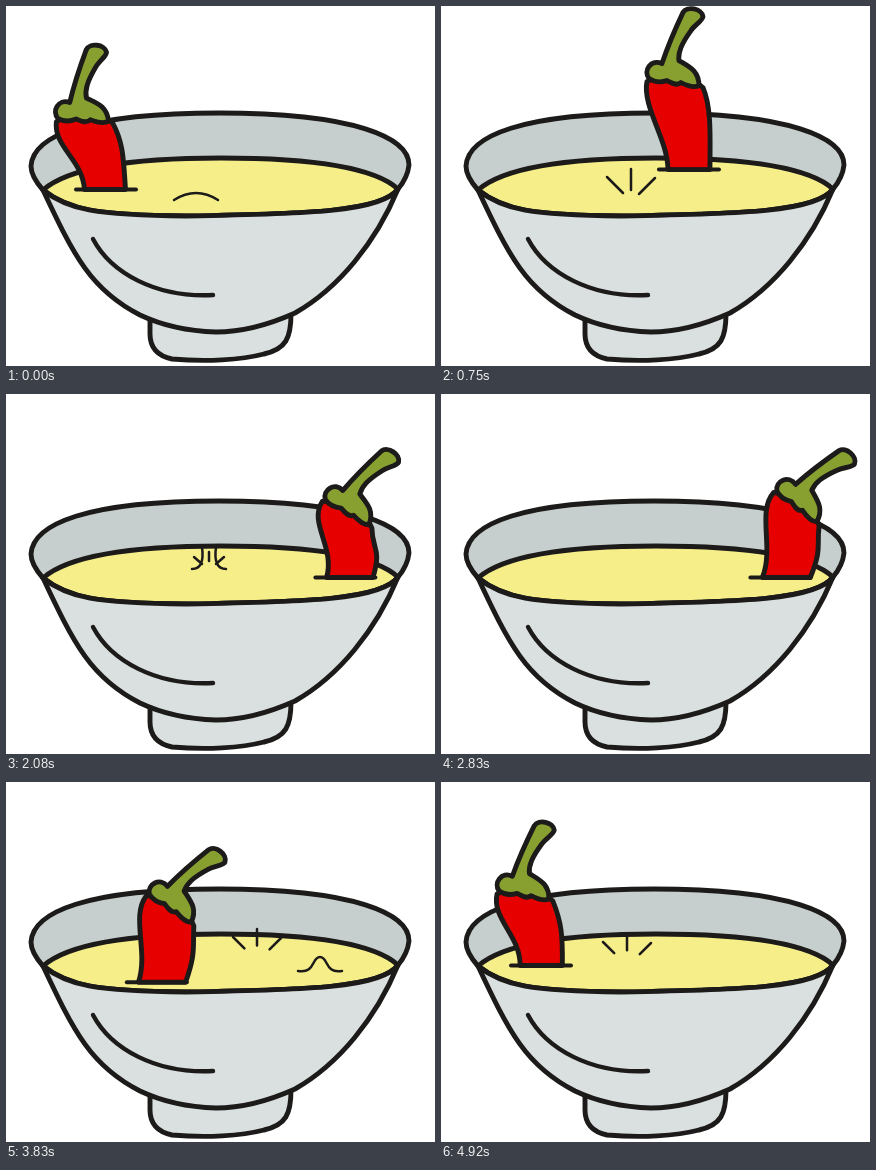
These frames come from a looping animation (429 by 360 pixels, 5000 ms). An HTML page with a canvas:

```html
<!DOCTYPE html>
<html>
<head>
<meta charset="utf-8">
<style>
html, body { margin: 0; height: 100%; overflow: hidden; background: #fff; }
canvas { display: block; }
</style>
</head>
<body>
<canvas id="stage" width="429" height="360"></canvas>
<script>
const ctx = document.getElementById('stage').getContext('2d');
const LOOP = 5000, STEP = LOOP / 60;
const INK = '#1d1b1a', GLAZE = '#d9e0df';

const FOOT = 'M144 312V328C144 342 152 350 166 353C200 356 235 354 258 348C280 343 285 332 285 308Z';
const INSIDE = 'M37 184C29 175 25 168 25 160C27 130 80 107 213 107C350 107 403 132 403 159C402 168 398 176 392 183Z';
const SOUP = 'M37 184C62 162 125 152 215 152C305 152 368 161 392 183C376 206 300 208 180 210C90 209 62 204 37 184Z';
const FRONT = 'M37 184C62 204 90 209 180 210C300 208 376 206 392 183C370 236 333 282 289 307C260 320 235 326 210 326C180 325 155 319 134 309C85 284 68 250 37 184Z';
const SHINE = 'M87 233C105 267 150 292 207 289';
const STEM = 'M-11-15C-7-27 0-45 10-66C14-73 29-70 30-62C30-58 22-54 18-48C8-34 5-26 6-18C16-12 26-8 26 7C20 10 12 6 8 4C4 8-2 4-6 2C-12 4-18 4-24 0C-30-8-22-20-11-15Z';

// time, calyx offset from the waterline, tilt in degrees
const POSES = [
  [0, -24, -73, -5], [750, -16, -91, 0], [1250, -10, -83, 11], [2080, 2, -69, 22],
  [3420, 29, -79, 36], [4330, -4, -76, 14], [4920, -18, -74, 1], [5000, -24, -73, -5]
];
// birth time, x, y
const BUBBLES = [
  [0, 190, 194], [950, 112, 189], [1560, 203, 175],
  [3000, 251, 178], [3580, 314, 189], [4080, 186, 183]
];

const clamp01 = v => Math.max(0, Math.min(1, v));

function shape(d, fill, width = 4.9) {
  const path = new Path2D(d);
  if (fill) { ctx.fillStyle = fill; ctx.fill(path); }
  ctx.lineWidth = width;
  ctx.stroke(path);
}

function poseAt(t) {
  const i = POSES.findIndex(p => p[0] > t);
  const a = POSES[i - 1], b = POSES[i];
  const k = (t - a[0]) / (b[0] - a[0]);
  return a.map((v, n) => v + (b[n] - v) * k).slice(1);
}

// Half an ellipse along the back, a rest, then the front half.
function waterline(t) {
  const turn = Math.PI * (clamp01((t - 97) / 1134) + clamp01((t - 3045) / 1134));
  return [219.7 - 119.7 * Math.cos(turn), 183.5 - 20.5 * Math.sin(turn)];
}

function drawPepper(t) {
  const [x, y] = waterline(t), [dx, dy, tilt] = poseAt(t);
  const angle = tilt * Math.PI / 180, cos = Math.cos(angle), sin = Math.sin(angle);
  const at = (u, v) => `${x + dx + u * cos - v * sin} ${y + dy + u * sin + v * cos} `;
  const mid = x + .2 * tilt, half = 21 + .1 * tilt, lean = .4 * tilt;
  const left = mid - half, right = mid + half;
  shape(`M${at(-26, 3)}C${at(-31, 28)}${left + lean} ${y - 30} ${left} ${y}H${right}` +
    `C${right + lean} ${y - 30} ${at(39, 30)}${at(30, 9)}C${at(20, -2)}${at(-10, -6)}${at(-26, 3)}Z`, '#e60000');
  ctx.save();
  ctx.translate(x + dx, y + dy);
  ctx.rotate(angle);
  shape(STEM, '#87a030');
  ctx.restore();
  shape(`M${x - 30} ${y}H${x + 30}`, null, 4);
}

function bubblePath(age) {
  if (age < 120) return 'M-22 0Q0-14 22 0';
  if (age < 480) {
    const w = 22 - Math.max(0, age - 300) * .025;
    const h = 7 + (age - 100) * .045;
    const foot = w * .2, neck = w * .4;
    return `M${-w} 0C${-foot} 3 ${-neck} ${-h} 0 ${-h}C${neck} ${-h} ${foot} 3 ${w} 0`;
  }
  if (age < 600)
    return 'M-17 0Q-4 0-7-22M17 0Q4 0 7-22M0-17V-8M-15-12L-7-5M15-12L7-5';
  const outer = Math.min(24, 12 + (age - 600) * .08);
  const inner = 7 + Math.max(0, age - 750) * .055;
  return `M${-outer} ${-outer + 1}L${-inner - 1} ${-inner}M${outer} ${-outer + 2}L${inner + 1} ${-inner + 1}` +
    `M0 ${-outer - 7}V${-inner - 3}`;
}

function drawBubbles(t) {
  for (const [birth, x, y] of BUBBLES) {
    const age = t - birth;
    if (age < 0 || age > 870) continue;
    ctx.save();
    ctx.translate(x, y);
    shape(bubblePath(age), null, 2.5);
    ctx.restore();
  }
}

function draw(now) {
  const t = Math.floor((now % LOOP + 4) / STEP) % 60 * STEP;
  ctx.clearRect(0, 0, 429, 360);
  ctx.strokeStyle = INK;
  ctx.lineCap = ctx.lineJoin = 'round';
  shape(FOOT, GLAZE);
  shape(INSIDE, '#c6cfcd');
  shape(SOUP, '#f5ee89');
  drawBubbles(t);
  drawPepper(t);
  shape(FRONT, GLAZE);
  shape(SHINE, null, 4.4);
  requestAnimationFrame(draw);
}
requestAnimationFrame(draw);
</script>
</body>
</html>
```
